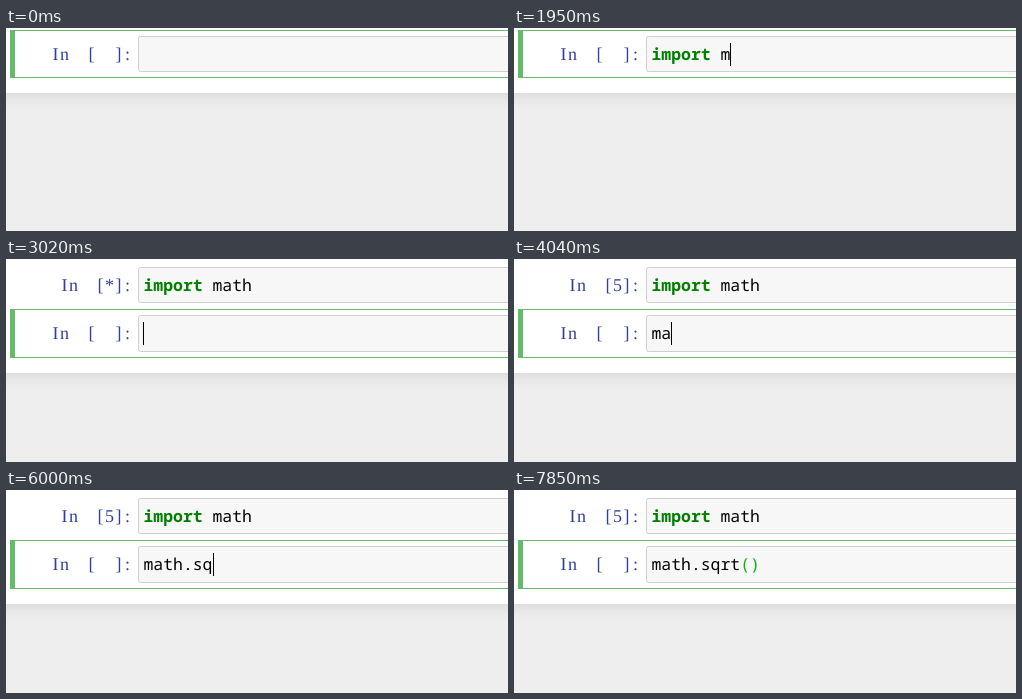
An HTML page for the animation above (8 s loop, 502 px wide and 203 px high).

```html
<!DOCTYPE html>
<html lang="en">
<head>
<meta charset="utf-8">
<title>Notebook typing</title>
<style>
  html, body { margin: 0; width: 100%; height: 100%; overflow: hidden; background: #eee; }
  body { position: relative; }
  #page {
    position: absolute; left: -30px; right: -30px; top: -30px;
    background: #fff; box-shadow: 0 0 15px 1px rgba(87, 87, 87, .2);
  }
  svg { position: absolute; left: 0; top: 0; display: block; }
  text { white-space: pre; text-rendering: geometricPrecision; }
  .prompt { font: 18px "Liberation Serif", serif; fill: #303f9f; text-anchor: middle; }
  .code { font: 16.47px "Noto Sans Mono", monospace; fill: #000; }
  .keyword { font-weight: bold; fill: #008000; }
  .bracket { fill: #00bb00; }
  .box { fill: #f7f7f7; stroke: #cfcfcf; }
  .frame { fill: #66bb6a; }
</style>
</head>
<body>
<div id="page"></div>
<svg id="stage" width="502" height="203" viewBox="0 0 502 203"></svg>
<script>
const NS = "http://www.w3.org/2000/svg";
const LOOP = 8000, RUN = 3020, DONE = 3420;
const CODE_X = 137.4, PITCH = 9.88, CELL = 9;
const stage = document.getElementById("stage");
const page = document.getElementById("page");

// [time, text, caret column]; no column means the caret is hidden
const first = [
  [0, ""], [70, "i", 1], [220, "im", 2], [780, "im"],
  [890, "imp", 3], [1000, "impo", 4], [1120, "impor", 5], [1230, "import", 6],
  [1630, "import ", 7], [1950, "import m", 8], [2100, "import ma", 9],
  [2220, "import mat", 10], [2330, "import math", 11], [2870, "import math"]
];
const second = [
  [RUN, "", 0], [3570, ""], [3890, "m", 1], [4040, "ma", 2], [4200, "mat", 3],
  [4350, "math", 4], [4900, "math"], [5370, "math.", 5], [5830, "math.s", 6],
  [6000, "math.sq", 7], [6530, "math.sq"], [6690, "math.sqr", 8],
  [6840, "math.sqrt", 9], [7320, "math.sqrt()", 10], [7850, "math.sqrt()"]
];

function add(parent, tag, attrs) {
  const el = document.createElementNS(NS, tag);
  for (const key in attrs) el.setAttribute(key, attrs[key]);
  return parent.appendChild(el);
}

function rect(parent, x, y, width, height, cls) {
  return add(parent, "rect", { x, y, width, height, class: cls || "" });
}

function makeCell(top, height) {
  const root = add(stage, "g", {});
  const frame = add(root, "g", {});
  rect(frame, 4, top, 5, height, "frame");
  rect(frame, 4, top, 520, 1, "frame");
  rect(frame, 4, top + height - 1, 520, 1, "frame");
  const box = rect(root, 132.5, top + 6.5, 400, height - 13, "box");
  box.setAttribute("rx", 2);
  const prompt = add(root, "text", { class: "prompt", y: top + 30 });
  const code = add(root, "text", { class: "code", x: CODE_X, y: top + 30 });
  const caret = rect(root, 0, top + 13, 1, 23);
  return { root, frame, prompt, code, caret };
}

// Each blank in the prompt takes two columns.
function setPrompt(cell, mark) {
  const label = "In [" + mark + "]:";
  let x = 126 - CELL * (label.length + label.split(" ").length - 1);
  const centres = [];
  for (const ch of label) {
    centres.push(x + CELL / 2);
    x += ch === " " ? CELL * 2 : CELL;
  }
  cell.prompt.setAttribute("x", centres.join(" "));
  cell.prompt.textContent = label.replace(/ /g, "\u00a0");
}

function setCode(cell, text) {
  cell.code.textContent = "";
  for (const part of text.split(/(\bimport\b|\(\))/)) {
    if (!part) continue;
    const cls = part === "import" ? "keyword" : part === "()" ? "bracket" : "";
    add(cell.code, "tspan", { class: cls }).textContent = part;
  }
}

function show(el, on) {
  el.style.display = on ? "" : "none";
}

function update(cell, keys, t, active, mark) {
  const [, text, column] = keys.filter(k => k[0] <= t).pop() || keys[0];
  show(cell.frame, active);
  show(cell.caret, active && column !== undefined);
  cell.caret.setAttribute("x", Math.round(CODE_X + PITCH * (column || 0)));
  if (cell.text !== text) setCode(cell, cell.text = text);
  if (cell.mark !== mark) setPrompt(cell, cell.mark = mark);
}

const top1 = makeCell(2, 48);
const top2 = makeCell(50, 49);
const start = performance.now();

function draw(now) {
  const t = Math.max(0, now - start) % LOOP;
  const ran = t >= RUN;
  page.style.height = (ran ? 114 : 65) + 30 + "px";
  show(top2.root, ran);
  update(top1, first, t, !ran, !ran ? " " : t < DONE ? "*" : "5");
  update(top2, second, t, ran, " ");
  requestAnimationFrame(draw);
}
draw(start);
</script>
</body>
</html>
```
